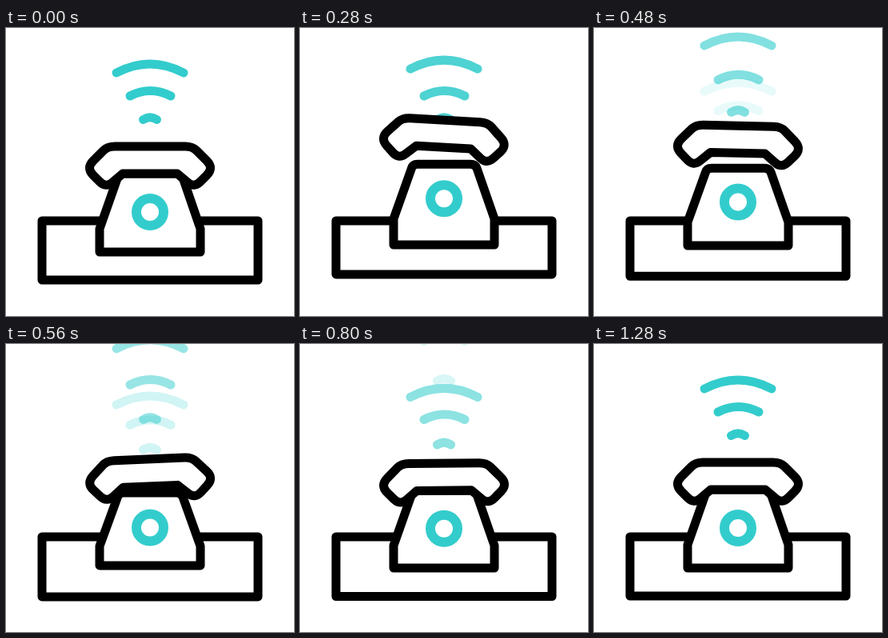
An HTML page that plays this animation: 360x360 px, repeating every 1.48 s.

```html
<!DOCTYPE html>
<html lang="en">
<head>
<meta charset="utf-8">
<title>Ringing phone</title>
<style>
  html, body { margin: 0; width: 100%; height: 100%; overflow: hidden; background: #fff; }
  svg { display: block; width: 100vw; height: 100vh; }
  path, rect, circle { stroke-width: 11; stroke-linecap: round; stroke-linejoin: round; }
  .ink { fill: #fff; stroke: #000; }
  .teal { fill: none; stroke: #33cccc; }
</style>
</head>
<body>
<svg viewBox="0 0 360 360">
  <g id="waves"></g>
  <rect id="base" class="ink" x="45" y="241" width="270" height="74"/>
  <path id="body" class="ink"/>
  <circle id="dial" class="teal" cx="180" cy="230" r="17" style="stroke-width:12"/>
  <path id="handset" class="ink" d="M136 148H224Q233 148 238 153L251 166Q260 175 251 184L243 192Q235 200 227 193L214 182H146L133 193Q125 200 117 192L109 184Q100 175 109 166L122 153Q127 148 136 148Z"/>
</svg>
<script>
const LOOP = 1480, STEP = 40, START = 200, END = 1280;
const $ = id => document.getElementById(id);
const clamp = v => Math.min(1, Math.max(0, v));
const span = (t, from, to) => clamp((t - from) / (to - from));
const easeOut = f => Math.sin(f * Math.PI / 2);
const easeInOut = f => (1 - Math.cos(f * Math.PI)) / 2;

// Spring to `peak`, swing over to `dip`, settle at zero
function swing(t, peak, dip) {
  return peak * easeOut(span(t, 160, 370))
    + (dip - peak) * easeInOut(span(t, 370, 660))
    - dip * easeInOut(span(t, 660, 840));
}

// Each arc flies off after a delay; its successor rises into place by `end`
const arcs = [
  { d: "M138 56Q180 34 222 56", end: 1060, speed: 0.04 },
  { d: "M155 85Q180.5 72 206 85", end: 1140, speed: 0.028 },
  { d: "M171.5 114.5Q180 109 188.5 114.5", end: 1240, speed: 0.026 }
];

function addArc(d) {
  const p = document.createElementNS("http://www.w3.org/2000/svg", "path");
  p.setAttribute("d", d);
  p.setAttribute("class", "teal");
  return $("waves").appendChild(p);
}

for (const a of arcs) {
  a.leaving = addArc(a.d);
  a.arriving = addArc(a.d);
}

function place(el, y, opacity) {
  el.setAttribute("transform", `translate(0 ${y})`);
  el.setAttribute("opacity", opacity);
}

function drawWaves(t) {
  const fadeOut = 1 - span(t, 180, 940);
  const fadeIn = span(t, 400, 1120);
  arcs.forEach((a, i) => {
    const age = Math.max(0, t - START - 80 * i);
    place(a.leaving, -34 * (age / 280) ** 1.55, fadeOut);
    place(a.arriving, Math.max(0, a.end - t) * a.speed, fadeIn);
  });
}

function bodyPath(t) {
  const top = 182 + swing(t, -15, 11);
  const shoulder = 251 + swing(t, -16, 8);
  const foot = 280 + swing(t, -11.5, 0);
  return `M117 ${foot}V${shoulder}L139.5 ${top + 5}Q141 ${top} 147 ${top}` +
    `H213Q219 ${top} 221 ${top + 5}L243 ${shoulder}V${foot}Z`;
}

function drawPhone(t) {
  $("base").setAttribute("height", 74 + swing(t, -9, 4.5));
  $("body").setAttribute("d", bodyPath(t));
  $("dial").setAttribute("cy", 230 + swing(t, -21.5, 7));
  $("handset").setAttribute("transform",
    `translate(0 ${swing(t, -42, 9.5)}) rotate(${swing(t, 4.2, -4.8)} 180 172)`);
}

const origin = performance.now();
function tick() {
  const now = (performance.now() - origin) % LOOP;
  const t = now < START || now >= END ? 0 : Math.floor(now / STEP) * STEP;
  drawWaves(t);
  drawPhone(t);
  requestAnimationFrame(tick);
}
tick();
</script>
</body>
</html>
```
